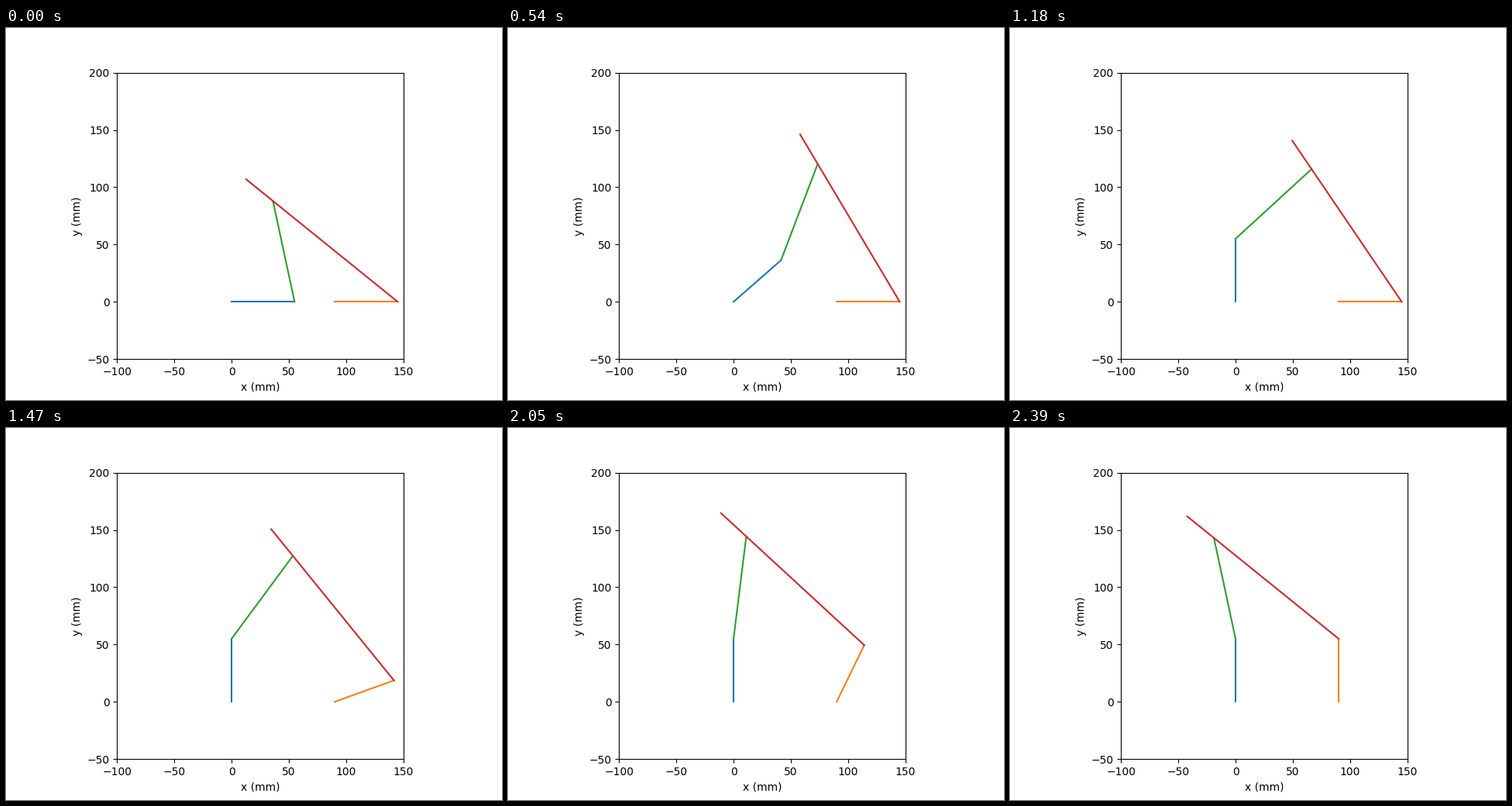
Write a matplotlib script that moves like this. It is 640 px wide and 480 px high and loops after 2410 ms.

```python
import numpy as np
import matplotlib.pyplot as plt
from matplotlib.animation import FuncAnimation

# Linkage sizes in mm
BASE = 90
CRANK = 55
ROD = 90
ARM = 140
TIP = 30

# Timing in ms
TICK = 10
STEP = 20
LOOP = 2410
SWITCH = 1230   # the second crank starts here, after a short rest
LAST = 59       # steps per 90 degree sweep

fig, ax = plt.subplots(figsize=(6.4, 4.8), dpi=100)
ax.set_aspect("equal")
ax.set_xlim(-100, 150)
ax.set_ylim(-50, 200)
ax.set_xlabel("x (mm)")
ax.set_ylabel("y (mm)")
links = [ax.plot([], [], color=f"C{i}")[0] for i in range(4)]


def crank_angles(t):
    if t < SWITCH:
        left, right = min(t // STEP, LAST), 0
    else:
        left, right = LAST, (t - SWITCH) // STEP + 1
    return np.pi / 2 * left / LAST, np.pi / 2 * right / LAST


def crank_end(pivot, angle):
    return pivot + CRANK * np.array([np.cos(angle), np.sin(angle)])


def upper_joint(a, b):
    """Upper crossing of the circles of radius ROD at a and ARM at b."""
    d = np.hypot(*(b - a))
    u = (b - a) / d
    along = (ROD**2 - ARM**2 + d**2) / (2 * d)
    height = np.sqrt(ROD**2 - along**2)
    return a + along * u + height * np.array([-u[1], u[0]])


def draw(i):
    left, right = crank_angles(i * TICK)
    p, q = np.array([0.0, 0.0]), np.array([BASE, 0.0])
    a, b = crank_end(p, left), crank_end(q, right)
    joint = upper_joint(a, b)
    tip = joint + (joint - b) * TIP / ARM
    for line, ends in zip(links, [(p, a), (q, b), (a, joint), (b, tip)]):
        line.set_data(*np.transpose(ends))
    return links


anim = FuncAnimation(fig, draw, frames=LOOP // TICK, interval=TICK,
                     repeat=True, repeat_delay=0)
plt.show()
```
